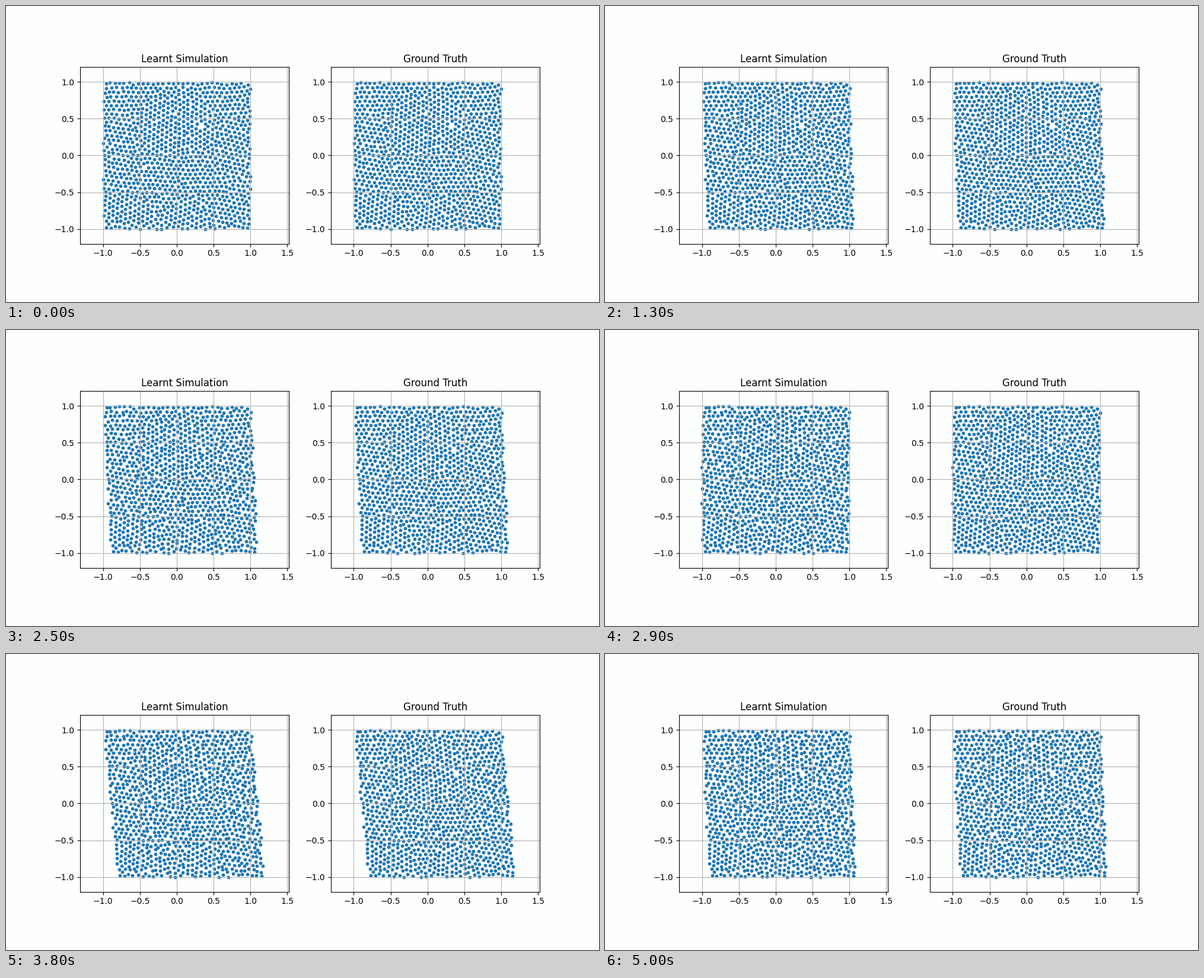
Animation of 1000x500 px, one loop 5100 ms. Source, as a matplotlib script:

```python
import numpy as np
import matplotlib.pyplot as plt
from matplotlib.animation import FuncAnimation

FRAMES, INTERVAL = 51, 100
SPACING = 0.0662
rng = np.random.default_rng(4)

# Crystal grains: centre x, centre y, lattice angle in degrees
GRAINS = np.array([
    (-0.75, 0.8, 1), (-0.75, 0.25, -9), (-0.75, -0.3, -6), (-0.7, -0.8, 24),
    (-0.2, 0.35, 27), (0.2, 0.4, 30), (0.25, -0.25, 0), (0.1, -0.8, 22),
    (0.75, 0.75, 3), (0.75, 0.2, -14), (0.75, -0.75, -12), (-0.2, -0.4, -5),
])


def hex_lattice(angle):
    i, j = np.meshgrid(np.arange(-26, 27), np.arange(-30, 31))
    x = (i + 0.5 * (j % 2)) * SPACING
    y = j * SPACING * np.sqrt(3) / 2
    c, s = np.cos(np.radians(angle)), np.sin(np.radians(angle))
    return np.column_stack([(c * x - s * y).ravel(), (s * x + c * y).ravel()])


def grain_points():
    parts = []
    for k, (cx, cy, angle) in enumerate(GRAINS):
        p = hex_lattice(angle) + (cx, cy)
        dist = np.hypot(p[:, :1] - GRAINS[:, 0], p[:, 1:] - GRAINS[:, 1])
        parts.append(p[(dist.argmin(axis=1) == k) & (np.abs(p).max(axis=1) < 1)])
    return np.concatenate(parts)


def relax(points, steps=60):
    """Push close neighbours apart inside slightly uneven walls."""
    wall = rng.uniform(0.955, 0.99, points.shape)
    wall[rng.random(points.shape) < 0.1] = 1.0
    reach = 1.12 * SPACING
    for _ in range(steps):
        dx = points[:, None, 0] - points[None, :, 0]
        dy = points[:, None, 1] - points[None, :, 1]
        r = np.sqrt(dx * dx + dy * dy) + 1e-9
        push = 0.2 * np.maximum(reach - r, 0) / r
        step = np.column_stack([(push * dx).sum(1), (push * dy).sum(1)])
        points = np.clip(points + step, -wall, wall)
    return points


rest = relax(grain_points())
rest = rest[np.hypot(rest[:, 0] - 0.33, rest[:, 1] - 0.4) > 0.05]
rest = np.clip(rest + rng.normal(0, 0.004, rest.shape), -1, 1)
drift = rng.normal(0, 0.006, rest.shape)
error = rng.normal(0, 0.004, rest.shape)

# Turning points of the swing: time in seconds, shift of the lower edge
TIMES = np.array([0, 0.7, 1.88, 3.1, 4.3, 5.45])
SHIFTS = np.array([0, -0.1, 0.222, -0.022, 0.31, -0.02])


def swing(t):
    k = min(np.searchsorted(TIMES, t, side="right") - 1, len(TIMES) - 2)
    u = (t - TIMES[k]) / (TIMES[k + 1] - TIMES[k])
    return SHIFTS[k] + (SHIFTS[k + 1] - SHIFTS[k]) * (1 - np.cos(np.pi * u)) / 2


def positions(t):
    depth = (1 - rest[:, 1]) / 2
    amount = swing(t)
    bend = 0.06 * amount - 0.022 * np.exp(-((t - 0.75) / 0.4) ** 2)
    p = rest + drift * t / 5
    p[:, 0] += amount * depth + bend * np.sin(np.pi * depth) * min(1, t / 0.3)
    p[:, 1] = np.clip(p[:, 1], -1, 1)
    return p


fig, axes = plt.subplots(1, 2, figsize=(10, 5), dpi=100, facecolor="#fdfefe")
clouds = []
for ax, title in zip(axes, ("Learnt Simulation", "Ground Truth")):
    ax.set_title(title)
    ax.set_facecolor("#fdfefe")
    ax.set_aspect("equal", adjustable="box")
    ax.set_xlim(-1.312, 1.523)
    ax.set_ylim(-1.2005, 1.1995)
    ax.set_xticks(np.arange(-1, 1.6, 0.5))
    ax.set_yticks(np.arange(-1, 1.1, 0.5))
    ax.grid(True)
    clouds.append(ax.scatter(rest[:, 0], rest[:, 1], s=10, color="C0"))


def update(frame):
    t = frame * INTERVAL / 1000
    p = positions(t)
    clouds[0].set_offsets(p + error * np.sin(np.pi * t / 6))
    clouds[1].set_offsets(p)
    return clouds


anim = FuncAnimation(fig, update, frames=FRAMES, interval=INTERVAL, repeat=True)
plt.show()
```
